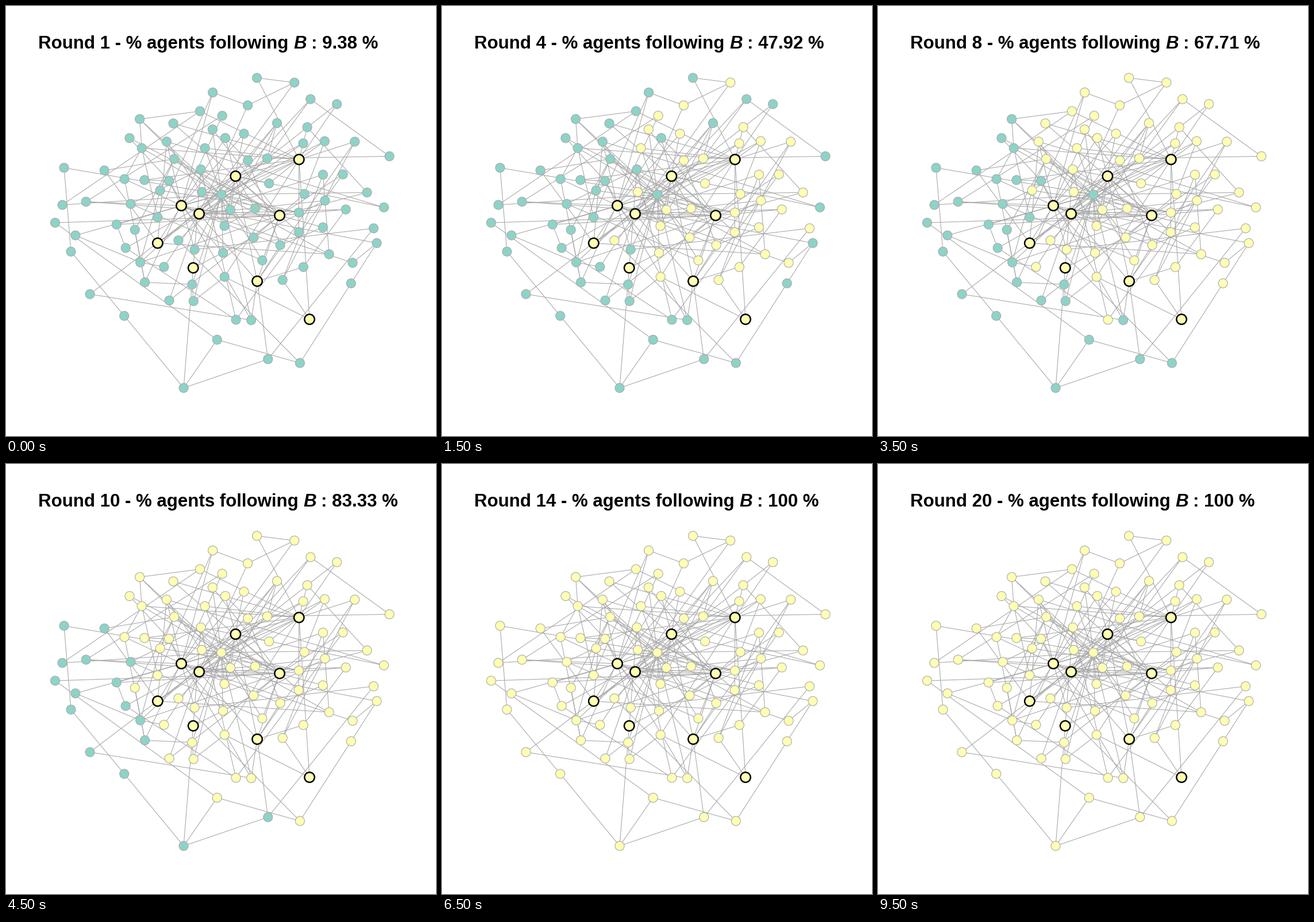
Write a matplotlib script that moves like this. It is 748 px wide and 748 px high and loops after 10 s.

```python
import numpy as np
import matplotlib.pyplot as plt
from matplotlib.animation import FuncAnimation
from matplotlib.collections import LineCollection

SIZE, DPI = 748, 100
PX = 72 / DPI  # points per pixel
ROUNDS, INTERVAL = 20, 500
TEAL, YELLOW, GREY = "#8DD3C7", "#FFFFB3", "#A9A9A9"
FONT_PX, BASELINE = 31.25, 74

AGENTS = 96
FOLLOWERS = [9, 22, 35, 46, 52, 57, 61, 65, 72, 80, 92, 96]  # after each round

# The agent in the middle and the first followers, most connected first.
CENTRE = [(374.6, 328)]
SEEDS = [(476, 364.4), (305, 347.3), (399.3, 296), (509.7, 267), (336, 361.5),
         (263.8, 412.5), (325.7, 455.5), (437, 478.7), (528, 545)]
# Agents on the rim, and the routes that join some of them.
RIM = [(101, 281.4), (113, 427.2), (205.7, 539), (309, 664.4), (367.2, 580.5),
       (511.3, 621), (600.2, 482.4), (645, 412.4), (455.7, 614.3),
       (436.5, 125), (501.7, 133.2), (146, 501.2), (85.5, 377), (98, 346),
       (120.8, 399), (139.2, 340.4), (171.2, 286), (232.6, 196.7),
       (291, 204.2), (337.4, 183), (359.6, 150.4), (529.7, 162),
       (575.6, 170.7), (606.7, 236), (667, 261.4), (628, 324.4),
       (657.4, 350.3), (639.5, 386.7), (603, 446.7), (426.6, 546.4),
       (400, 545.8), (326.2, 513.3), (284, 512.2), (241.6, 480.7)]
ROUTES = [range(8), (3, 8), (9, 10)]

rng = np.random.default_rng(12)


def distance(points, spot):
    return np.hypot(*(np.asarray(points) - spot).T)


def fill_interior(points, total, tries=25):
    """Add agents inside an ellipse, each as far from the others as possible."""
    points = list(points)
    while len(points) < total:
        radius = np.sqrt(rng.random(tries))
        angle = rng.uniform(0, 2 * np.pi, tries)
        spots = np.column_stack([385 + 215 * radius * np.cos(angle),
                                 335 + 172 * radius * np.sin(angle)])
        gaps = [distance(points, spot).min() for spot in spots]
        points.append(spots[np.argmax(gaps)])
    return np.array(points)


def connect(points, first_rim, hubs):
    """Give every agent two links, mostly to hubs and to agents nearby."""
    links = {(first_rim + a, first_rim + b)
             for route in ROUTES for a, b in zip(route, route[1:])}
    degree = np.bincount(np.ravel(list(links)), minlength=len(points))
    pull = np.ones(len(points))
    pull[:hubs] = 34 * 0.8 ** np.arange(hubs)
    for i, point in enumerate(points):
        weight = pull * np.exp(-distance(points, point) / 170)
        weight[i] = 0
        picks = rng.choice(len(points), max(0, 2 - degree[i]), replace=False,
                           p=weight / weight.sum())
        links |= {(min(i, j), max(i, j)) for j in picks}
    return np.array(sorted(links))


def adoption_rounds(points, links, seeds):
    """B spreads outwards from the right; well connected agents hold out."""
    degree = np.bincount(links.ravel(), minlength=len(points))
    delay = distance(points, (500, 330)) + 5 * degree
    delay += rng.normal(0, 25, len(points))
    delay[seeds] = -1
    rank = np.argsort(np.argsort(delay))
    return 1 + np.searchsorted(FOLLOWERS, rank, side="right")


hubs = len(CENTRE + SEEDS)
agents = fill_interior(CENTRE + SEEDS + RIM, AGENTS)
links = connect(agents, hubs, hubs)
seeds = np.zeros(AGENTS, bool)
seeds[len(CENTRE):hubs] = True
adopted = adoption_rounds(agents, links, seeds)

fig = plt.figure(figsize=(SIZE / DPI, SIZE / DPI), dpi=DPI, facecolor="white")
ax = fig.add_axes([0, 0, 1, 1], xlim=(0, SIZE), ylim=(SIZE, 0))
ax.axis("off")
ax.add_collection(LineCollection(agents[links], colors=GREY,
                                 linewidths=1.1 * PX, zorder=1))
dots = ax.scatter(*agents.T, s=(np.where(seeds, 17.4, 16) * PX) ** 2, zorder=2,
                  edgecolors=np.where(seeds, "#000000", GREY),
                  linewidths=np.where(seeds, 2.5, 1.1) * PX)


def label(x, text="", style="normal"):
    return ax.text(x, BASELINE, text, family="Liberation Sans", weight="bold",
                   style=style, size=FONT_PX * PX, color="black",
                   va="baseline", ha="left")


LETTER_X, SHARE_X = 500.3, 531
heading = label(56)
letter = label(LETTER_X, "B", "italic")
share = label(SHARE_X)


def draw(frame):
    current = frame + 1
    following = adopted <= current
    dots.set_facecolors(np.where(following, YELLOW, TEAL))

    # A second digit pushes the rest along; "11" is kerned tighter.
    shift = FONT_PX * (0.556 * (current > 9) - 0.056 * (current == 11))
    heading.set_text(f"Round {current} - % agents following")
    letter.set_x(LETTER_X + shift)
    share.set_x(SHARE_X + shift)
    share.set_text(f": {round(100 * following.mean(), 2):g} %")
    return dots, heading, letter, share


anim = FuncAnimation(fig, draw, frames=ROUNDS, interval=INTERVAL,
                     repeat=True, repeat_delay=0, blit=False)
plt.show()
```
